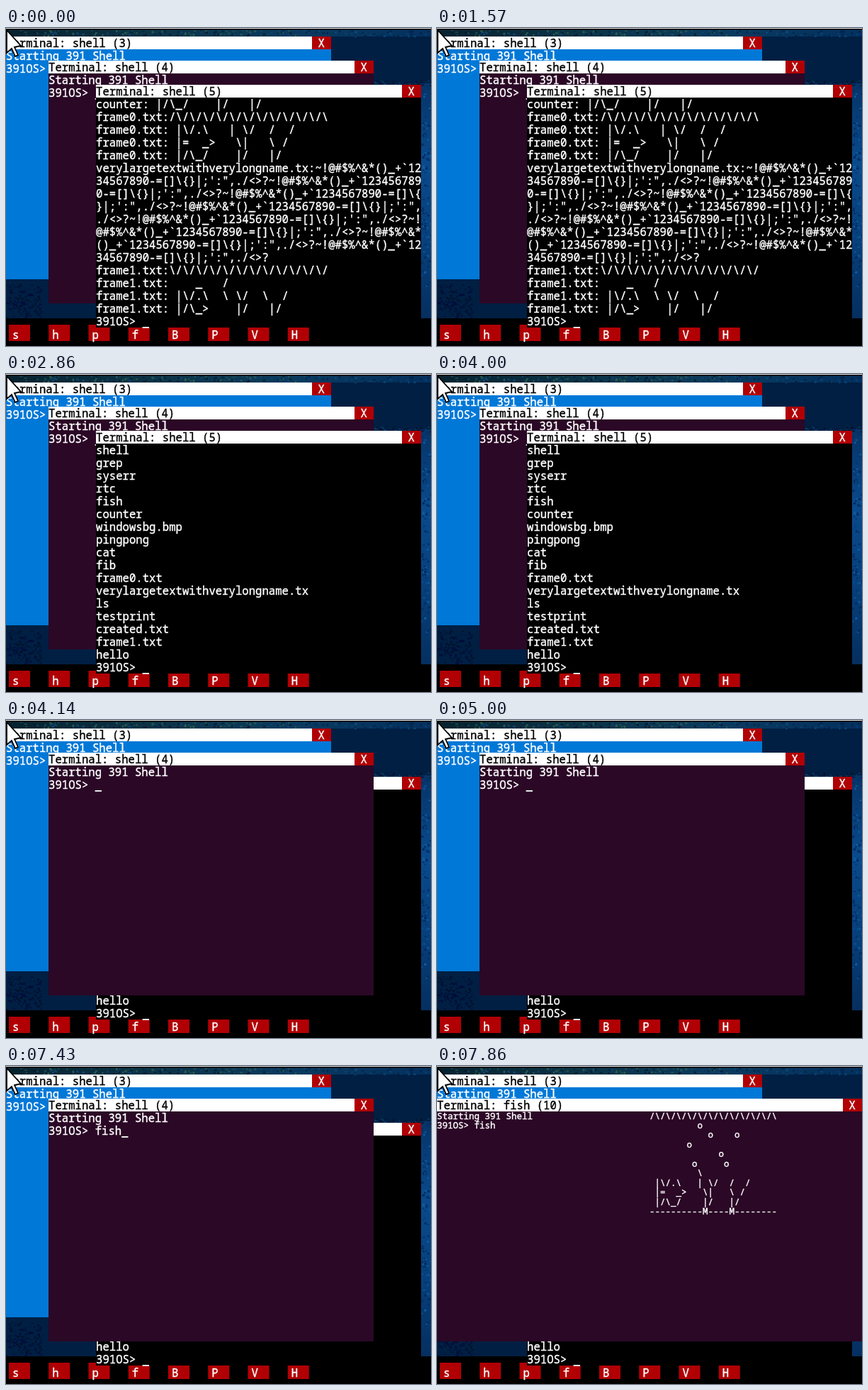
These frames come from a looping animation (600x448 px, 8000 ms). An HTML page with a canvas:

```html
<!DOCTYPE html>
<html lang="en">
<head>
<meta charset="utf-8">
<title>Shell windows</title>
<style>
html, body { margin: 0; width: 100%; height: 100%; overflow: hidden; background: #000; }
canvas { display: block; width: 600px; height: 448px; }
</style>
</head>
<body>
<canvas id="stage" width="600" height="448"></canvas>
<script>
const ctx = document.getElementById('stage').getContext('2d');
const LOOP = 8000;
const CELL = 9.375, ROW = 18, COLS = 49;
const SMALL_CELL = 7.5, SMALL_ROW = 13.45;
const WIN_W = 459, WIN_H = 342;
const RED = '#b10004', BLUE = '#0078d7', PURPLE = '#2b0826', NAVY = '#001f43';

// Times of the key presses and their results
const T = { l: 2290, s: 2430, run: 2570, done: 2710, front: 4140, type: 7000, fish: 7570 };

const raw = String.raw;
const symbols = "~!@#$%^&*()_+`1234567890-=[]\\{}|;':\",./<>?";
const wrap = s => s.match(new RegExp(`.{1,${COLS}}`, 'g'));

const frame0 = [
  raw`/\ `.trim().repeat(12),
  raw` |\/.\   | \/  /  /`,
  raw` |=  _>   \|   \ /`,
  raw` |/\_/    |/   |/`
];
const frame1 = [
  raw`\/`.repeat(12),
  raw`    _   /`,
  raw` |\/.\  \ \/  \  /`,
  raw` |/\_>    |/   |/`
];
const grepRows = [
  'counter:' + frame0[3],
  ...frame0.map(s => 'frame0.txt:' + s),
  ...wrap('verylargetextwithverylongname.tx:' + symbols.repeat(8)),
  ...frame1.map(s => 'frame1.txt:' + s)
];
const files = ('shell grep syserr rtc fish counter windowsbg.bmp pingpong cat fib frame0.txt ' +
  'verylargetextwithverylongname.tx ls testprint created.txt frame1.txt hello').split(' ');
const tank = [
  frame0[0],
  '         o',
  '           o    o',
  '       o',
  '             o',
  '        o     o',
  raw`         \ `,
  ...frame0.slice(1),
  '----------M----M--------'
];

function rect(x, y, w, h, color) {
  ctx.fillStyle = color;
  ctx.fillRect(x, y, w, h);
}

// One character per grid cell, y is the baseline
function text(s, x, y, color = '#fff', cell = CELL) {
  ctx.font = `${cell / 0.6}px "Noto Sans Mono", monospace`;
  ctx.fillStyle = ctx.strokeStyle = color;
  ctx.lineWidth = 0.4;
  [...s].forEach((ch, i) => {
    if (ch === ' ') return;
    ctx.fillText(ch, x + i * cell, y);
    ctx.strokeText(ch, x + i * cell, y);
  });
}

function windowFrame(x, y, w, title, body) {
  rect(x, y, w, WIN_H, body);
  rect(x, y, w, ROW, '#fff');
  text('Terminal: ' + title, x, y + 15, '#000');
  rect(x + w - 27, y, 27, ROW, RED);
  text('X', x + w - 18.5, y + 14.5);
}

function shell(x, y, title, body, rows) {
  windowFrame(x, y, WIN_W, title, body);
  rows.forEach((s, i) => text(s, x, y + ROW * (i + 1) + 15));
  const cursorX = x + rows[rows.length - 1].length * CELL;
  rect(cursorX, y + ROW * rows.length + 17, CELL, 1.8, '#fff');
}

const intro = cmd => ['Starting 391 Shell', '391OS> ' + cmd];

function fishWindow() {
  windowFrame(0, 46, 600, 'fish (10)', PURPLE);
  const line = (s, x, r) => text(s, x, 74.5 + r * SMALL_ROW, '#fff', SMALL_CELL);
  intro('fish').forEach((s, i) => line(s, 0, i));
  tank.forEach((s, i) => line(s, 300, i));
}

function frontRows(t) {
  if (t >= T.done) return [...files, '391OS> '];
  if (t >= T.run) return [...grepRows.slice(1), '391OS> ls', ''];
  return [...grepRows, '391OS> ' + (t >= T.s ? 'ls' : t >= T.l ? 'l' : '')];
}

function speckle(seed, n, x, y, w, h, colors) {
  const rnd = () => (seed = (seed * 16807) % 2147483647) / 2147483647;
  for (let i = 0; i < n; i++) {
    rect(x + rnd() * w, y + rnd() * h, 1.5 + rnd() * 2, 1.2 + rnd() * 2,
      colors[Math.floor(rnd() * colors.length)]);
  }
}

function fade(x0, y0, x1, y1, ...colors) {
  const g = ctx.createLinearGradient(x0, y0, x1, y1);
  colors.forEach((c, i) => g.addColorStop(i / (colors.length - 1), c));
  return g;
}

function wallpaper() {
  rect(0, 0, 600, 448, NAVY);
  rect(0, 0, 600, 12, fade(0, 0, 600, 0, '#06222f', '#0b3346', '#0a3a5e', '#03305f'));
  speckle(11, 130, 20, 2, 400, 8, ['#12484f', '#2a5a4a', '#0d4470', '#041c30']);
  speckle(23, 50, 420, 2, 180, 9, ['#0a4a80', '#032448', '#0b3d6c']);
  rect(0, 0, 600, 1, '#e4eaec');
  rect(0, 1, 600, 1.5, '#000');
  rect(586, 78, 14, 331, fade(0, 78, 0, 409, '#063468', '#0a4a8c', '#07407c', '#052f60'));
  speckle(37, 90, 586, 78, 14, 290, ['#02285a', '#0d5ba0', '#043064']);
  speckle(41, 30, 520, 73, 80, 7, ['#02142c', '#0a3a66']);
  speckle(53, 150, 0, 360, 50, 48, ['#01102c', '#020c3a', '#00183a']);
}

function taskbar() {
  rect(0, 409, 600, 39, '#000');
  [...'shpfBPVH'].forEach((ch, i) => {
    const x = 4 + i * 56.25;
    rect(x, 418, 30, 23, RED);
    text(ch, x + 5, 437.5);
  });
}

function pointer() {
  ctx.beginPath();
  [[1, 3], [1, 35], [8, 29], [13, 40], [17, 38], [12, 27], [21, 25]]
    .forEach(p => ctx.lineTo(...p));
  ctx.closePath();
  ctx.fillStyle = '#fff';
  ctx.fill();
  ctx.strokeStyle = '#000';
  ctx.lineWidth = 1.8;
  ctx.stroke();
}

function draw(t) {
  wallpaper();
  taskbar();
  shell(0, 12, 'shell (3)', BLUE, intro(''));
  const listing = t >= T.run && t < T.done;
  const black = () => shell(127, 80, listing ? 'ls (9)' : 'shell (5)', '#000', frontRows(t));
  const typed = t < T.type ? 0 : Math.floor((t - T.type) / 143) + 1;
  const purple = () => shell(60, 46, 'shell (4)', PURPLE, intro('fish'.slice(0, typed)));
  if (t < T.front) {
    purple();
    black();
  } else {
    black();
    t < T.fish ? purple() : fishWindow();
  }
  pointer();
}

function tick() {
  draw(performance.now() % LOOP);
  requestAnimationFrame(tick);
}
tick();
</script>
</body>
</html>
```
